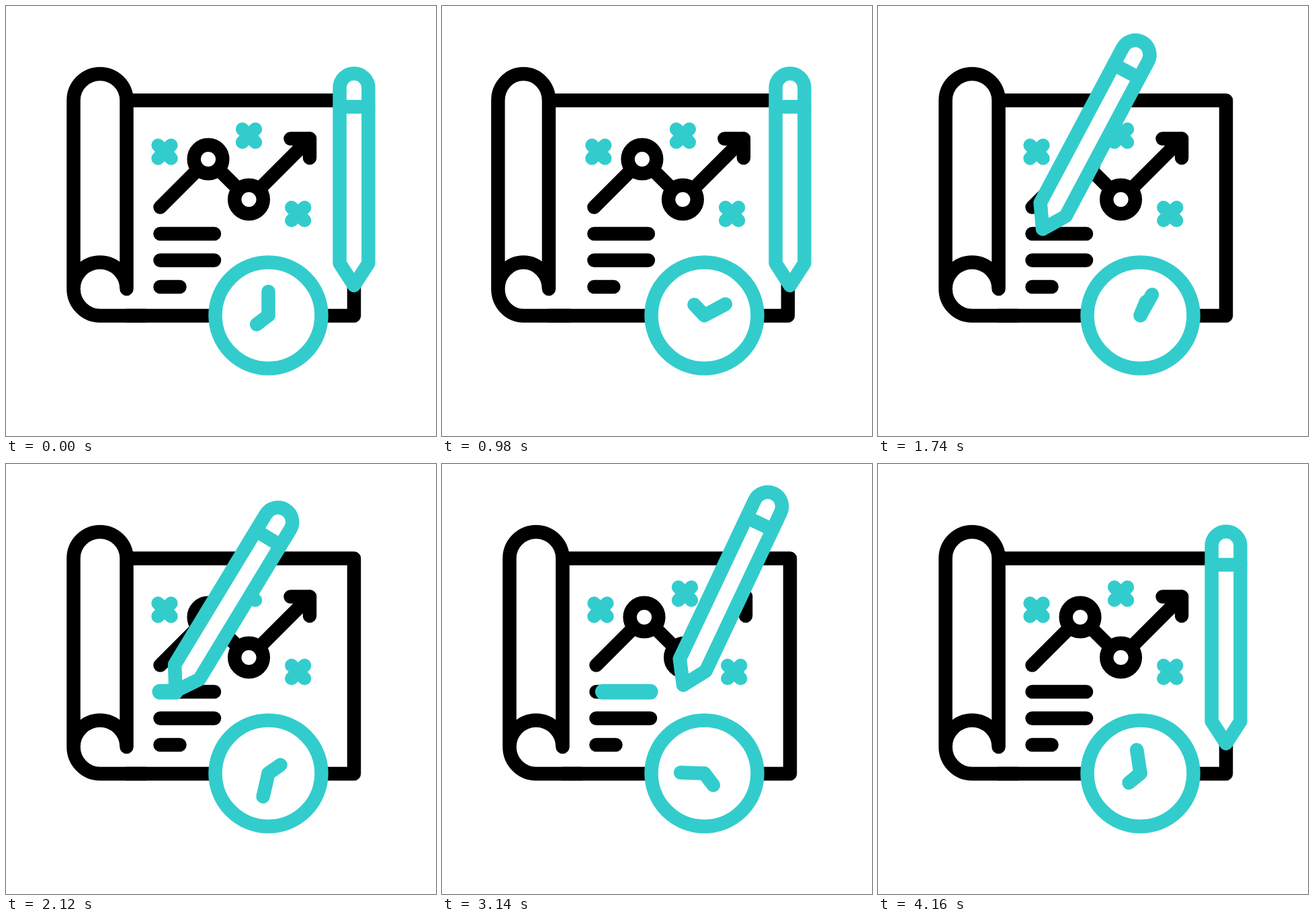
An HTML page with a canvas for the animation above (4180 ms loop, 640 by 640 pixels).

```html
<!DOCTYPE html>
<html lang="en">
<head>
<meta charset="utf-8">
<title>Project plan</title>
<style>
  html, body { margin: 0; width: 100%; height: 100%; overflow: hidden; background: #fff; }
  canvas { display: block; width: 100vmin; height: 100vmin; margin: 0 auto; }
</style>
</head>
<body>
<canvas id="stage" width="640" height="640"></canvas>
<script>
const ctx = document.getElementById('stage').getContext('2d');
const LOOP = 4180;
const INK = '#000', TEAL = '#33cccc', PAPER = '#fff';
const STROKE = 20.5;
const TAU = Math.PI * 2;

// Smooth curve through [time, value] points without overshoot between them.
function track(...pts) {
  const last = pts.length - 1;
  const slope = i => (pts[i + 1][1] - pts[i][1]) / (pts[i + 1][0] - pts[i][0]);
  const tangent = pts.map((p, i) => {
    if (i === 0 || i === last) return 0;
    const a = slope(i - 1), b = slope(i);
    return a * b <= 0 ? 0 : 2 * a * b / (a + b);
  });
  return t => {
    if (t <= pts[0][0]) return pts[0][1];
    if (t >= pts[last][0]) return pts[last][1];
    let i = 0;
    while (t > pts[i + 1][0]) i++;
    const h = pts[i + 1][0] - pts[i][0];
    const u = (t - pts[i][0]) / h, v = 1 - u;
    return v * v * (1 + 2 * u) * pts[i][1] + u * u * (3 - 2 * u) * pts[i + 1][1]
      + h * u * v * (v * tangent[i] - u * tangent[i + 1]);
  };
}

const rollShift = track([0, 0], [300, 45], [560, 13], [810, -45], [1080, 0], [1290, 11], [1400, 9], [1640, 0]);
const rollWidth = track([0, 79], [300, 90], [560, 84.5], [810, 70], [1080, 79], [1290, 81], [1400, 80.5], [1640, 79]);
const sheetShift = track([400, 0], [560, -6], [780, -12], [1080, 0]);

const tipX = track([1080, 518], [1400, 427], [1500, 378], [1640, 297], [1740, 245], [1850, 229],
  [1900, 229], [2540, 314.5], [2720, 314.5], [3140, 359], [3240, 396], [3400, 470], [3550, 507], [3720, 518]);
const tipY = track([1080, 416], [1400, 340], [1500, 329.5], [1640, 330], [1740, 332], [1850, 338],
  [2540, 337], [2720, 337], [3140, 329], [3240, 329], [3400, 346], [3550, 386], [3720, 416]);
const tilt = track([1080, 0], [1400, 12.5], [1500, 18], [1640, 24.5], [1740, 28], [1850, 30],
  [2500, 32], [2720, 32], [3140, 25.3], [3240, 22], [3400, 14], [3550, 6.5], [3720, 0]);
const eraseX = track([2960, 229], [3760, 310]);

function stroke(color, width = STROKE) {
  ctx.strokeStyle = color;
  ctx.lineWidth = width;
  ctx.stroke();
}

function line(color, points, width) {
  ctx.beginPath();
  points.forEach(([x, y]) => ctx.lineTo(x, y));
  stroke(color, width);
}

function ring(color, x, y, r) {
  ctx.beginPath();
  ctx.arc(x, y, r, 0, TAU);
  ctx.fillStyle = PAPER;
  ctx.fill();
  stroke(color);
}

function cross(x, y) {
  const d = 9.7;
  line(TEAL, [[x - d, y - d], [x + d, y + d]], 20);
  line(TEAL, [[x - d, y + d], [x + d, y - d]], 20);
}

function drawSheet(left) {
  line(INK, [[left, 140.5], [518, 140.5], [518, 461], [left, 461]]);
  line(INK, [[229.5, 299.5], [301, 228], [361.5, 288], [452, 197.5]]);
  line(INK, [[423.5, 197.5], [452, 197.5], [452, 226]]);
  ring(INK, 301, 228, 21.3);
  ring(INK, 361.5, 288, 21.3);
  [[339, 310], [378.5, 310], [418, 258.5]].forEach(([y, end]) =>
    line(INK, [[229.5, y], [end, y]]));
  cross(236, 217);
  cross(361.5, 193);
  cross(434.7, 309.5);
}

function drawRoll(x, width) {
  const r = width / 2, mid = x + r, ry = 39.5;
  ctx.fillStyle = PAPER;
  ctx.beginPath();
  ctx.ellipse(mid, 140.5, r, ry, 0, Math.PI, TAU);
  ctx.lineTo(x + width, 421);
  ctx.ellipse(mid, 421, r, ry, 0, 0, Math.PI);
  ctx.fill();

  ctx.beginPath();
  ctx.moveTo(x + 107, 461);
  ctx.lineTo(mid, 461);
  ctx.ellipse(mid, 421, r, 40, 0, Math.PI / 2, Math.PI);
  ctx.lineTo(x, 140.5);
  ctx.ellipse(mid, 140.5, r, ry, 0, Math.PI, TAU);
  ctx.lineTo(x + width, 421);
  ctx.ellipse(mid, 421, r, ry, 0, TAU, Math.PI, true);
  stroke(INK);
}

function drawNote(t) {
  if (t < 1880 || t >= 3760) return;
  line(TEAL, [[eraseX(t), 339], [Math.min(tipX(t), 310), 339]], 23);
}

function hand(angle, length) {
  const x = 390.5, y = 460.5;
  line(TEAL, [[x, y], [x + length * Math.sin(angle), y - length * Math.cos(angle)]]);
}

function drawClock(t) {
  const turn = t / LOOP * TAU;
  ring(TEAL, 390.5, 460.5, 79);
  hand(turn * 5, 35.5);
  hand(turn + 232.4 * Math.PI / 180, 22);
}

function drawPencil(t) {
  const r = 21.4;
  ctx.save();
  ctx.translate(tipX(t), tipY(t));
  ctx.rotate(tilt(t) * Math.PI / 180);
  ctx.beginPath();
  ctx.moveTo(0, 0);
  ctx.lineTo(-r, -33);
  ctx.lineTo(-r, -294);
  ctx.arc(0, -294, r, Math.PI, TAU);
  ctx.lineTo(r, -33);
  ctx.closePath();
  ctx.fillStyle = PAPER;
  ctx.fill();
  stroke(TEAL);
  line(TEAL, [[-r, -266], [r, -266]]);
  ctx.restore();
}

function draw(t) {
  ctx.fillStyle = PAPER;
  ctx.fillRect(0, 0, 640, 640);
  ctx.lineCap = ctx.lineJoin = 'round';

  const rollX = 100.5 + rollShift(t), width = rollWidth(t), shift = sheetShift(t);
  ctx.save();
  ctx.translate(shift, 0);
  drawSheet(rollX + width - shift);
  ctx.restore();
  drawRoll(rollX, width);
  drawNote(t);
  drawClock(t);
  drawPencil(t);
}

const start = performance.now();
function tick() {
  const t = (performance.now() - start) % LOOP;
  draw(Math.floor(t / 20) * 20);
  requestAnimationFrame(tick);
}
tick();
</script>
</body>
</html>
```
